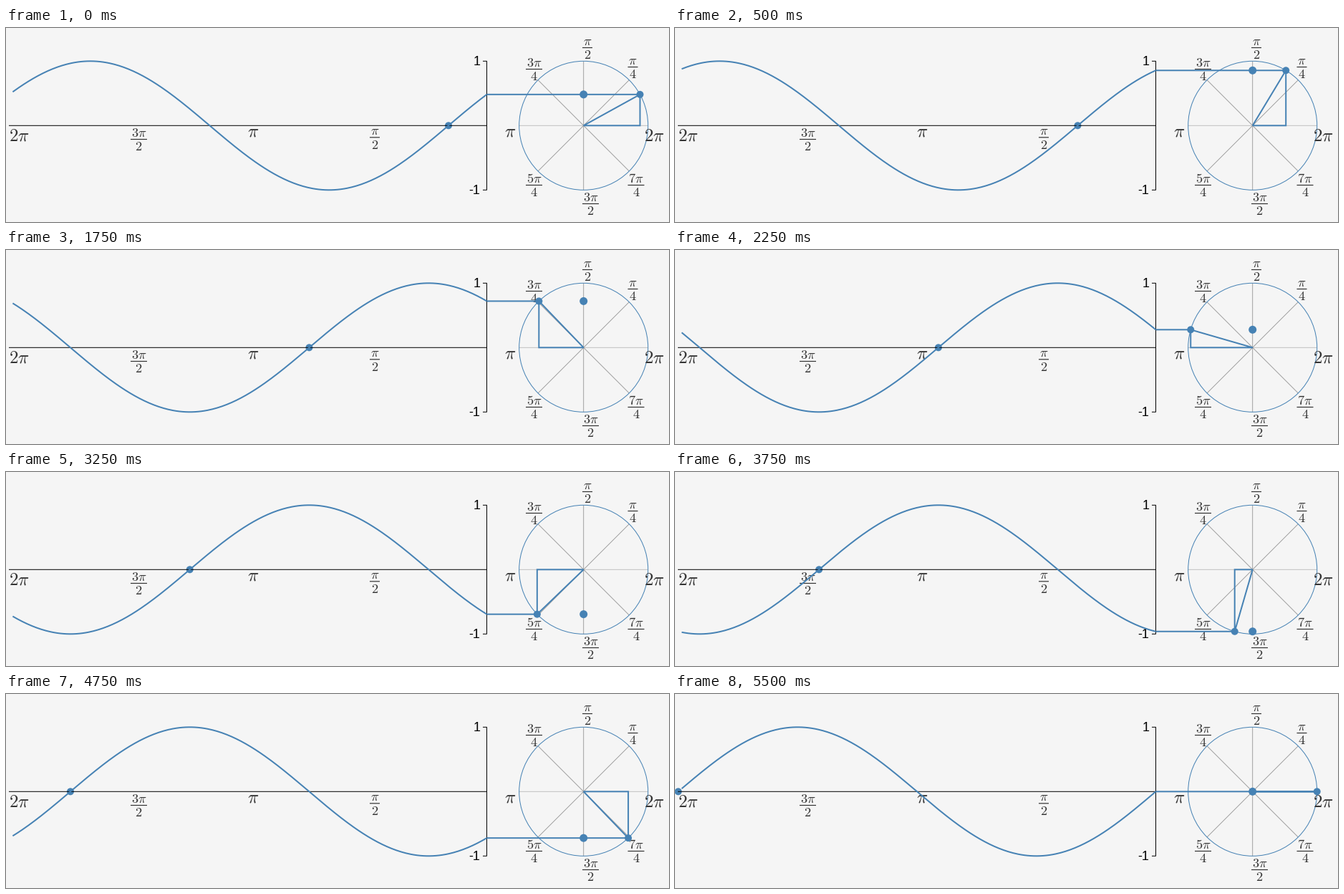
These frames come from a looping animation (926 by 271 pixels, 5.75 s). A matplotlib script:

```python
import numpy as np
import matplotlib.pyplot as plt
from matplotlib.animation import FuncAnimation
from matplotlib.patches import Circle

W, H, DPI = 926, 271, 100
FRAMES, INTERVAL = 23, 250
PX = 72 / DPI                      # points per pixel
TAU = 2 * np.pi

BLUE, INK, GRAY = "steelblue", "#333333", "#999999"
CX, CY, R = 806.7, 136.3, 90       # unit circle
AXIS_X, SPAN = 671.5, 667          # wave origin and width of one turn
WAVE_START = 9.4
START_ANGLE, STEP = 0.504, TAU / 24

plt.rcParams["mathtext.fontset"] = "cm"
plt.rcParams["font.family"] = "Liberation Sans"

fig = plt.figure(figsize=(W / DPI, H / DPI), dpi=DPI, facecolor="#f5f5f5")
ax = fig.add_axes([0, 0, 1, 1])
ax.set_xlim(0, W)
ax.set_ylim(H, 0)
ax.axis("off")


def line(xs, ys, color, width, z):
    item, = ax.plot(xs, ys, color=color, lw=width * PX, zorder=z,
                    solid_capstyle="butt", solid_joinstyle="miter")
    item.set_snap(False)
    return item


def dot(radius, z):
    return ax.add_patch(Circle((0, 0), radius, fc=BLUE, ec="none", zorder=z))


def label(x, y, text, size, align="center", color=INK):
    ax.text(x, y, text, size=size * PX, ha=align, va="baseline",
            color=color, zorder=3)


def fraction(x, bar_y, top, bottom):
    half = 11.5 if len(top) > 3 else 7
    label(x, bar_y - 3.8, f"${top}$", 18.5)
    label(x, bar_y + 15.8, f"${bottom}$", 18.5)
    line([x - half, x + half], [bar_y, bar_y], INK, 1.2, 3)


# Axes
line([4, AXIS_X], [CY, CY], "black", 1, 2)
line([666, AXIS_X, AXIS_X, 666], [CY - R, CY - R, CY + R, CY + R],
     "black", 1, 2)
label(662.5, 52.3, "1", 18, "right", "black")
label(662.5, 232.3, "-1", 18, "right", "black")

# Unit circle with its rays
for i in range(8):
    a = i * TAU / 8
    line([CX, CX + R * np.cos(a)], [CY, CY + R * np.sin(a)],
         "#bbbbbb" if i % 4 == 0 else GRAY, 0.9, 1)
ax.add_patch(Circle((CX, CY), R, fc="none", ec=BLUE, lw=PX, zorder=2))

# Angle labels
label(18.5, 157.5, r"$2\pi$", 25)
label(345.5, 151, r"$\pi$", 25)
label(704.5, 151, r"$\pi$", 25)
label(905.5, 157.5, r"$2\pi$", 25)
fraction(185.5, 155.5, r"3\pi", "2")
fraction(515, 152.8, r"\pi", "2")
fraction(812, 27.5, r"\pi", "2")
fraction(875.5, 54.5, r"\pi", "4")
fraction(737.5, 57.5, r"3\pi", "4")
fraction(737.5, 219.5, r"5\pi", "4")
fraction(816.5, 245.5, r"3\pi", "2")
fraction(880, 219.5, r"7\pi", "4")

# Moving parts
wave_x = np.linspace(WAVE_START, AXIS_X, 300)
wave = line([], [], BLUE, 2, 5)
link = line([], [], BLUE, 2, 5)
triangle = line([], [], BLUE, 2, 5)
axis_dot = dot(5, 1.5)
rim_dot = dot(5, 6)
height_dot = dot(5.5, 6)


def update(k):
    # The last step stops at exactly one full turn.
    angle = TAU if k == FRAMES - 1 else START_ANGLE + k * STEP
    x, y = CX + R * np.cos(angle), CY - R * np.sin(angle)
    phase = angle - (AXIS_X - wave_x) / SPAN * TAU
    wave.set_data(wave_x, CY - R * np.sin(phase))
    link.set_data([AXIS_X, x], [y, y])
    triangle.set_data([CX, x, x, CX], [CY, y, CY, CY])
    axis_dot.center = (AXIS_X - angle / TAU * SPAN, CY)
    rim_dot.center = (x, y)
    height_dot.center = (CX, y)
    return wave, link, triangle, axis_dot, rim_dot, height_dot


anim = FuncAnimation(fig, update, frames=FRAMES, interval=INTERVAL,
                     repeat=True, repeat_delay=0, blit=False)
plt.show()
```
